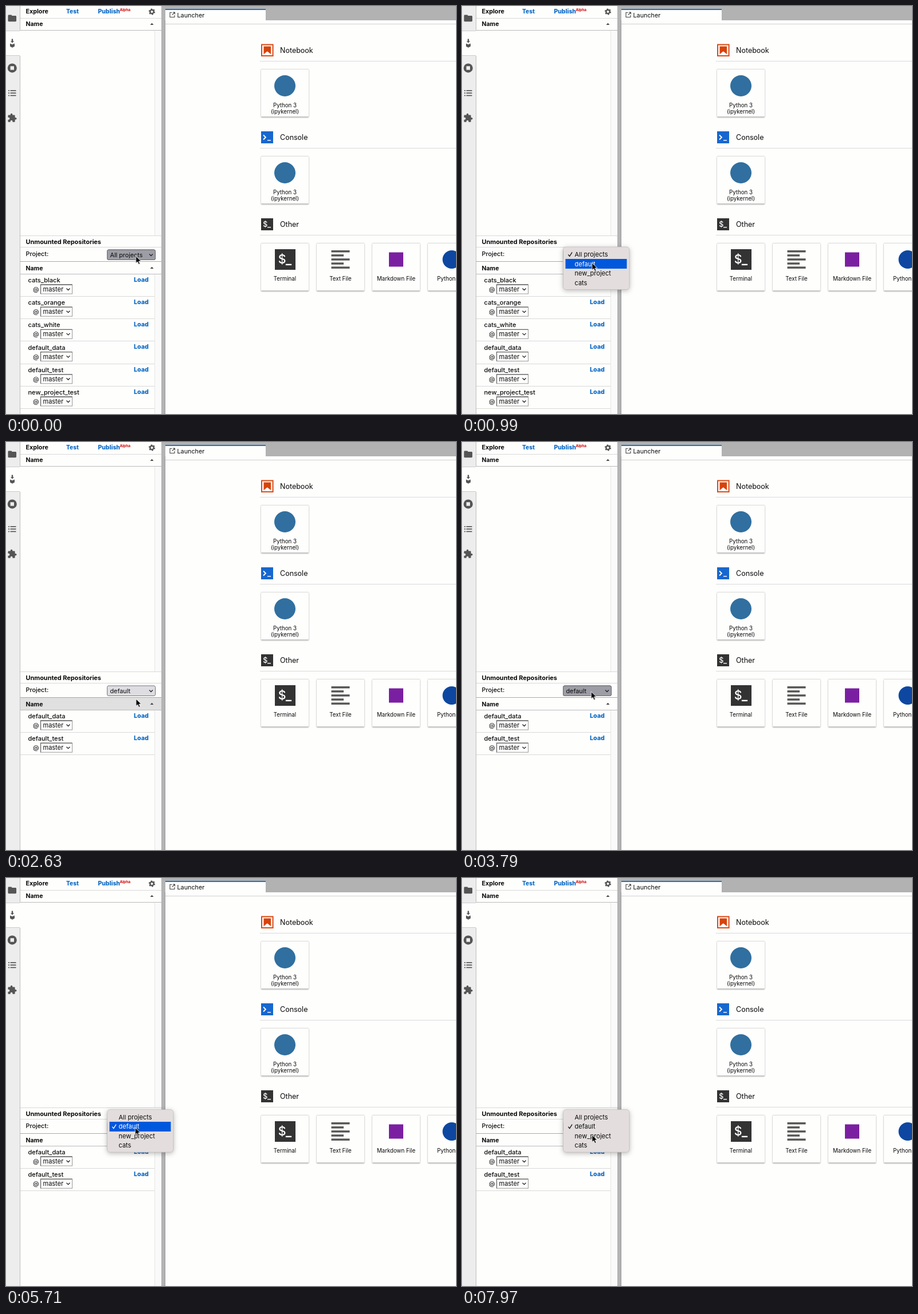
Recreate the animation shown at these times as an HTML page. Size 785x713 px, loop 7990 ms.

```html
<!DOCTYPE html>
<html lang="en">
<head>
<meta charset="utf-8">
<title>Launcher</title>
<style>
html, body { margin: 0; width: 100%; height: 100%; overflow: hidden; background: #fefefd; }
svg { display: block; width: 785px; height: 713px; font: 11px Inter, "Liberation Sans", sans-serif; fill: #0a0a0a; }
.b { font-weight: 700; }
.m { font-weight: 500; }
.blue { fill: #0869c6; font-weight: 800; }
.mid { text-anchor: middle; }
.chev { fill: none; stroke: #222; stroke-width: 1.3; }
.ico { fill: #555; }
.card { fill: #fefefd; filter: drop-shadow(0 0 .6px #0006) drop-shadow(0 1px 1px #0006); }
.pop { fill: #e3dddd; stroke: #b9b4b4; stroke-width: .6; filter: drop-shadow(0 2px 4px #0004); }

.t { animation: 7990ms step-end infinite; }
.all { animation-name: all; }
.some { animation-name: some; }
.press { animation-name: press; }
.hover { animation-name: hover; }
.menu1 { animation-name: menu1; animation-timing-function: linear; }
.menu2 { animation-name: menu2; }
.pick1-0 { animation-name: pick10; }
.pick1-1 { animation-name: pick11; }
.pick2-1 { animation-name: pick21; }
.pick2-2 { animation-name: pick22; }
.cursor { animation-name: cursor; animation-timing-function: ease-in-out; }

@keyframes all { 0% { opacity: 1 } 23.78%, 100% { opacity: 0 } }
@keyframes some { 0% { opacity: 0 } 23.78%, 100% { opacity: 1 } }
@keyframes press { 0% { opacity: 1 } .25% { opacity: 0 } 45.55% { opacity: 1 } 48.81%, 100% { opacity: 0 } }
@keyframes hover { 0% { opacity: 0 } 23.78% { opacity: 1 } 41% { opacity: 0 } 100% { opacity: 0 } }
@keyframes menu1 {
  0%, .249% { opacity: 0 }
  .25%, 21.15% { opacity: 1 }
  23.78%, 100% { opacity: 0 }
}
@keyframes menu2 { 0% { opacity: 0 } 48.81%, 100% { opacity: 1 } }
@keyframes pick10 { 0% { opacity: 1 } 6.8%, 100% { opacity: 0 } }
@keyframes pick11 { 0% { opacity: 0 } 6.8% { opacity: 1 } 19.14% { opacity: 0 } 20% { opacity: 1 } 100% { opacity: 1 } }
@keyframes pick21 { 0% { opacity: 1 } 75.1%, 100% { opacity: 0 } }
@keyframes pick22 { 0% { opacity: 0 } 75.1% { opacity: 1 } 99.74%, 100% { opacity: 0 } }
@keyframes cursor {
  0%, 4% { transform: translate(226.5px, 437px) }
  10%, 38.8% { transform: translate(226.8px, 449px) }
  45%, 71.3% { transform: translate(225.3px, 436.2px) }
  78.8%, 100% { transform: translate(226.8px, 449px) }
}
</style>
</head>
<body>
<svg id="stage" viewBox="0 0 785 713"></svg>
<script>
const PAPER = "#fefefd";
const text = (x, y, s, cls = "", size = 11) =>
  `<text x="${x}" y="${y}" class="${cls}" style="font-size:${size}px">${s}</text>`;
const rect = (x, y, w, h, fill, more = "") =>
  `<rect x="${x}" y="${y}" width="${w}" height="${h}" fill="${fill}" ${more}/>`;
const line = (x, y, w, fill = "#d9d9d9") => rect(x, y, w, 1, fill);
const chevron = (x, y) => `<path class="chev" d="M${x - 3} ${y - 1.5}l3 3 3-3"/>`;
const caret = y => `<path d="M251.5 ${y}l3-3.2 3 3.2z" fill="#444"/>`;
const dot = (x, y, r, fill) => `<circle cx="${x}" cy="${y}" r="${r}" fill="${fill}"/>`;

function sidebar() {
  const list = [147, 151.3, 155.6].map(y =>
    rect(4, y, 2, 1.7, "#555") + rect(7.5, y, 10, 1.7, "#555")).join("");
  return rect(0, 0, 24, 713, "#ededed") + rect(24, 0, 1, 713, "#bdbdbd") +
    rect(0, 43, 25, 44, PAPER) + line(0, 43, 24, "#ccc") + line(0, 86, 24, "#ccc") +
    `<g class="ico">
      <path transform="translate(2 12.7) scale(.73)" d="M10 4H4c-1.1 0-2 .9-2 2v12c0 1.1.9 2 2 2h16c1.1 0 2-.9 2-2V8c0-1.1-.9-2-2-2h-8z"/>
      <path d="M9.8 57.5h2.4v4h2l-3.2 3-3.2-3h2z"/>
      <path d="M7 65.5l4 1.8 4-1.8v5l-4 2.2-4-2.2z"/>
      <path transform="translate(2 187) scale(.72)" d="M20.5 11H19V7c0-1.1-.9-2-2-2h-4V3.5a2.5 2.5 0 0 0-5 0V5H4c-1.1 0-2 .9-2 2v3.8h1.5a2.7 2.7 0 0 1 0 5.4H2V20c0 1.1.9 2 2 2h3.8v-1.5a2.7 2.7 0 0 1 5.4 0V22H17c1.1 0 2-.9 2-2v-4h1.5a2.5 2.5 0 0 0 0-5z"/>
    </g>` + dot(10.8, 108.4, 8, "#555") + rect(7.6, 105.2, 6.4, 6.4, "#ededed") + list;
}

function row(name, i) {
  const y = 469 + i * 39.2;
  return text(38.5, y + 14, name, "m") + text(223, y + 12.8, "Load", "blue", 10.7) +
    text(47, y + 30, "@") +
    rect(60.5, y + 18, 55, 16, PAPER, 'stroke="#999"') +
    `<path d="M60.5 ${y + 34}v-16h55" fill="none" stroke="#666" stroke-width="1.3"/>` +
    text(64.5, y + 30, "master") + chevron(108.5, y + 26) + line(25, Math.round(y + 38), 234);
}

function project(label, cls) {
  return `<g class="t ${cls}">${text(181.5, 438.5, label, "", 10.8)}</g>`;
}

function browser() {
  const all = ["cats_black", "cats_orange", "cats_white", "default_data", "default_test", "new_project_test"];
  return rect(259, 43, 12, 358, "#fafafa") + rect(259, 469, 12, 244, "#fafafa") +
    rect(259, 43, 1, 358, "#e6e6e6") + rect(259, 469, 1, 244, "#e6e6e6") +
    text(34.5, 13, "Explore", "b", 10.7) + text(105, 13, "Test", "blue", 10.2) +
    text(160.5, 13, "Publish", "blue", 10.4) +
    `<g fill="#d00000">${text(198.5, 9, "Alpha", "b", 6.5)}</g>
    <circle cx="254.5" cy="10" r="3.2" fill="none" stroke="#555" stroke-width="2.4"/>
    <circle cx="254.5" cy="10" r="4.8" fill="none" stroke="#555" stroke-width="1.6" stroke-dasharray="2.5 2.526"/>` +
    line(25, 21, 246) + text(34.5, 35, "Name", "b", 10.5) + caret(33) + line(25, 42, 246, "#bbb") +
    line(25, 401, 246) + text(34.5, 415.7, "Unmounted Repositories", "b", 10.9) + line(25, 421, 246) +
    text(34.5, 437.3, "Project:", "m", 10.8) +
    rect(25, 446, 246, 23, "#e0e0e0", 'class="t hover"') +
    line(25, 446, 246, "#aaa") + text(34.5, 461.7, "Name", "b", 10.5) + caret(459) +
    line(25, 468, 246, "#bbb") +
    rect(176.5, 426, 84, 17.5, "#dedee2", 'rx="2.5" stroke="#77777c"') +
    rect(176.5, 426, 84, 17.5, "#9d9da5", 'rx="2.5" stroke="#66666b" class="t press"') +
    project("All projects", "all") + project("default", "some") + chevron(253, 435) +
    `<g class="t all">${all.map(row).join("")}</g>` +
    `<g class="t some">${all.slice(3, 5).map(row).join("")}</g>`;
}

const prompt = (x, y, size, sign) => {
  const mark = sign === "$"
    ? text(3.3, 14.8, "$", "m", 12.5)
    : '<path d="M4 6.5l4 4-4 4" fill="none" stroke="#fff" stroke-width="1.8"/>';
  return `<g transform="translate(${x} ${y}) scale(${size / 21})" fill="#fff">
    ${rect(0, 0, 21, 21, sign === "$" ? "#333" : "#1767cf")}${mark}${rect(11, 15, 6, 1.4, "#fff")}</g>`;
};

const card = (x, y) => `<rect class="card" x="${x}" y="${y}" width="83" height="83" rx="1"/>`;
const section = (y, label) => text(478, y + 5, label, "", 12.5) + line(443, y + 19, 342);

function kernel(y) {
  return card(445, y) + dot(486.5, y + 29, 18.5, "#306f9f") +
    text(486.5, y + 66, "Python 3", "mid", 9.7) + text(486.5, y + 77, "(ipykernel)", "mid", 9.7);
}

function launcher() {
  const doc = [0, 1, 2, 3, 4].map(i =>
    rect(567.5, 427 + i * 7.1, i % 2 ? 21.5 : 32, 3.5, "#555")).join("");
  const names = ["Terminal", "Text File", "Markdown File", "Python File"];
  return rect(271, 0, 6, 713, "#b4b4b4") + rect(277, 0, 1, 713, "#999") +
    rect(277, 0, 508, 25, "#b2b2b2") + rect(278, 5, 175, 22, PAPER) +
    rect(278, 5, 175, 2, "#1976c8") + line(278, 31, 507, "#cfcfcf") +
    '<path d="M289.5 11.5h-3.5v8h8v-3.5M290 15.5l4.3-4.3M291 11h3.5v3.5" fill="none" stroke="#444" stroke-width="1.1"/>' +
    text(298.5, 20, "Launcher", "", 10.8) +
    section(77, "Notebook") + section(229, "Console") + section(381, "Other") +
    rect(446, 67.5, 19.6, 19.6, PAPER, 'stroke="#d84a15" stroke-width="2"') +
    '<path d="M449.5 70.5h12.6v13.8l-6.3-5-6.3 5z" fill="#d8430c"/>' +
    prompt(445, 219, 21, ">") + prompt(445, 371, 21, "$") +
    kernel(110.5) + kernel(262.5) +
    names.map((n, i) => card(445 + i * 97, 414.5) + text(486.5 + i * 97, 479.7, n, "mid", 9.7)).join("") +
    prompt(469, 425, 36, "$") + doc +
    rect(668, 430.5, 25, 25, "#7b1fa2") + dot(777.5, 443, 16, "#0d47a1");
}

// Pop-up list; the checked entry sits over the select box.
function menu(id, top, checked, picks) {
  const items = ["All projects", "default", "new_project", "cats"].map((name, i) => {
    const y = top + 13 + i * 16.5;
    const label = text(196.5, y + 4, name) + (i === checked
      ? `<path d="M185.3 ${y + .4}l2.4 3 4.4-7" fill="none" stroke="currentColor" stroke-width="1.3"/>` : "");
    const pick = picks.includes(i)
      ? `<g class="t pick${id}-${i}" fill="#fff" color="#fff">${rect(180.5, Math.floor(y - 8), 107, 17, "#0058dc")}${label}</g>` : "";
    return `<g color="#111">${label}</g>${pick}`;
  });
  return `<g class="t menu${id}"><rect class="pop" x="176.5" y="${top}" width="115.5" height="74.5" rx="5"/>${items.join("")}</g>`;
}

const cursor = `<path class="t cursor" d="M0 0v12.6l2.9-2.7 2.1 4.7 2.3-1-2.1-4.6h4z"
  fill="#000" stroke="#fff" stroke-width=".9"/>`;

document.getElementById("stage").innerHTML =
  rect(0, 0, 785, 713, PAPER) + sidebar() + browser() + launcher() +
  menu(1, 421, 0, [0, 1]) + menu(2, 404.7, 1, [1, 2]) + cursor;
</script>
</body>
</html>
```
